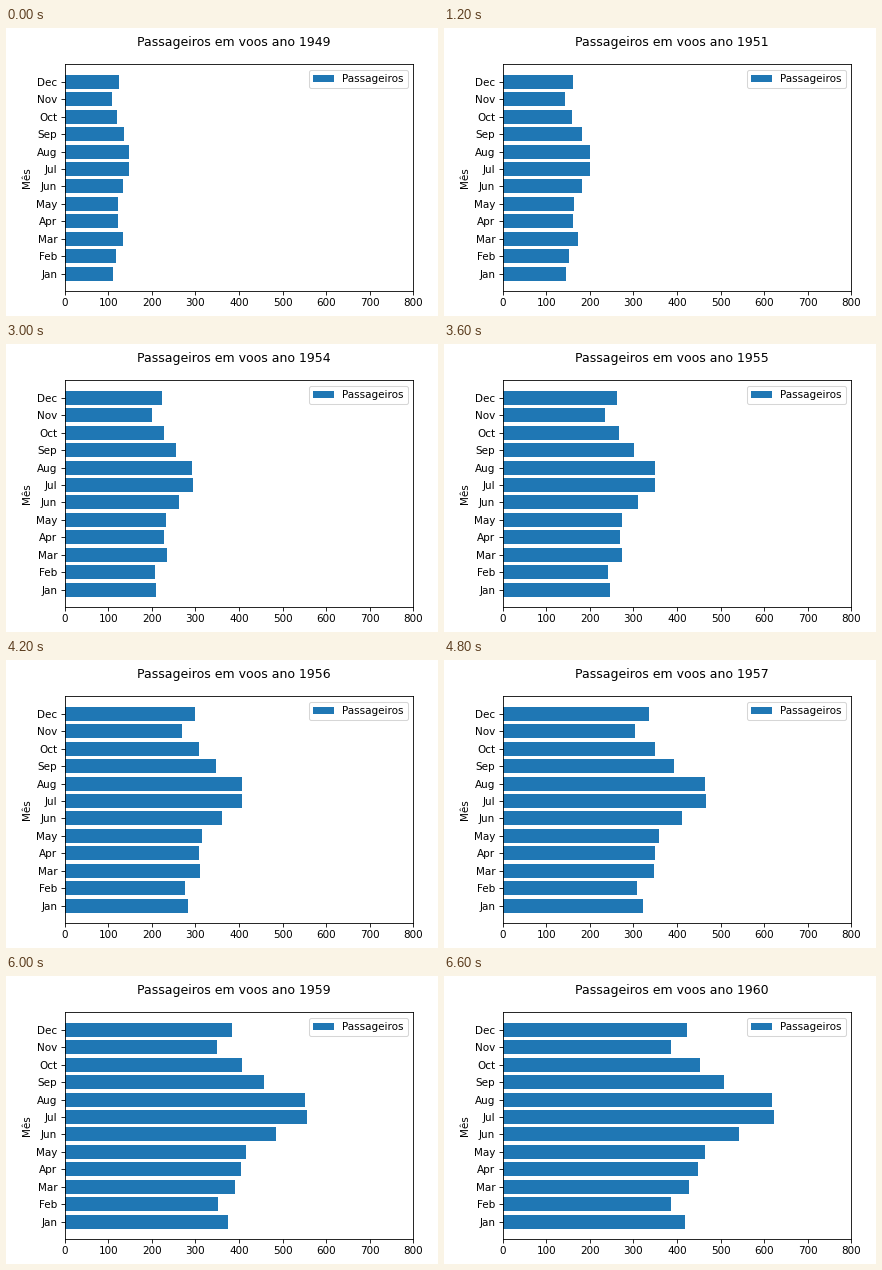
A matplotlib script for the animation above (7200 ms loop, 432 px wide and 288 px high).

```python
import matplotlib.pyplot as plt
import numpy as np
from matplotlib.animation import FuncAnimation

WIDTH, HEIGHT, DPI = 432, 288, 75
FIRST_YEAR, YEARS = 1949, 12
MONTHS = "Jan Feb Mar Apr May Jun Jul Aug Sep Oct Nov Dec".split()

# Yearly mean grows through a few key years
KEY_YEARS = [0, 1, 3, 5, 8, 9, 11]
KEY_MEANS = [127, 140, 197, 239, 368, 381, 476]

# Month relative to the yearly mean, at the start and at the end of the loop
EARLY = np.array([.868, .92, 1.05, .97, .967, 1.06,
                  1.16, 1.165, 1.076, .95, .855, .975])
LATE = np.array([.878, .81, .90, .94, .974, 1.14,
                 1.31, 1.30, 1.066, .95, .81, .89])


def passengers(year):
    """Growing mean times a summer peak that sharpens over the years."""
    progress = year / (YEARS - 1)
    season = EARLY + (LATE - EARLY) * progress
    return np.interp(year, KEY_YEARS, KEY_MEANS) * season


plt.rcParams["font.family"] = "DejaVu Sans"

fig = plt.figure(figsize=(WIDTH / DPI, HEIGHT / DPI), dpi=DPI, facecolor="white")
ax = fig.add_axes([58.6 / WIDTH, 25.05 / HEIGHT, 348.75 / WIDTH, 226.5 / HEIGHT])
bars = ax.barh(MONTHS, passengers(0), color="#1f77b4", label="Passageiros")
ax.set_xlim(0, 800)
ax.set_ylim(-0.99, 11.99)
ax.set_ylabel("Mês")
ax.legend(loc="upper right")
title = fig.suptitle("", x=228 / WIDTH, y=1 - 8 / HEIGHT, fontsize=12)


def update(year):
    for bar, count in zip(bars, passengers(year)):
        bar.set_width(count)
    title.set_text(f"Passageiros em voos ano {FIRST_YEAR + year}")
    return [*bars, title]


anim = FuncAnimation(fig, update, frames=YEARS, interval=600,
                     repeat=True, repeat_delay=0, blit=False)
plt.show()
```
